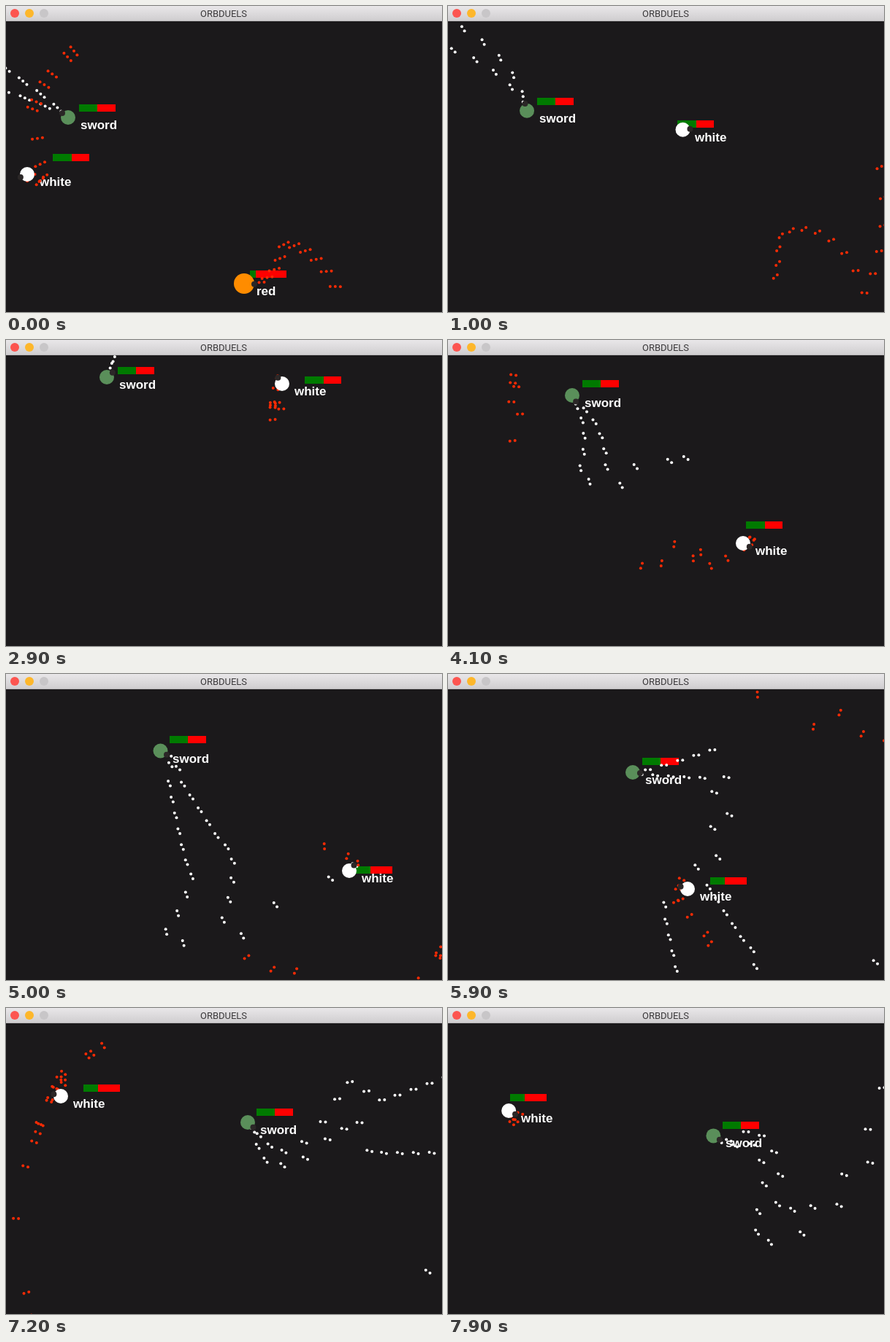
These frames come from a looping animation (597 by 420 pixels, 8 s). An HTML page with a canvas:

```html
<!DOCTYPE html>
<html>
<head>
<meta charset="utf-8">
<style>
  html, body { margin: 0; width: 100%; height: 100%; overflow: hidden; background: #1b191b; }
  canvas { display: block; }
</style>
</head>
<body>
<canvas id="stage" width="597" height="420"></canvas>
<script>
const ctx = document.getElementById('stage').getContext('2d');
const LOOP = 8000, FRAME = 100, LAG = 70, RAD = Math.PI / 180;

// path: waypoints [ms, x, y]; turns: key angles [ms, degrees]; aim(t, k): angle of shot k
const red = {
  name: 'red', color: '#ff8c00', shot: '#fa2b05', radius: 14, speed: 232, every: 95, dies: 1000,
  life: () => 8,
  path: [[-1200, 194, 381], [0, 326, 381], [1000, 436, 388]],
  turns: [[-1000, 4], [-480, -27], [0, 3], [700, -54], [1000, -40]],
  aim: t => at(red.turns, t)[0] * RAD
};

const sword = {
  name: 'sword', color: '#5a8f5a', shot: '#fff', radius: 10, speed: 202, every: 71,
  life: () => 25,
  path: [[-500, 80, 153], [0, 85, 153], [1300, 115, 141], [1900, 124, 114], [2900, 138, 51],
         [3200, 146, 31], [4100, 170, 76], [5900, 253, 135], [7200, 331, 157], [8000, 368, 178]],
  turns: [[-400, -148], [0, -143], [1390, -90], [1600, -50], [1900, -42], [2800, -80], [3100, 45],
          [3400, 72], [3900, 59], [4750, 59], [5250, 4], [6050, 6], [6200, -5], [6450, 4],
          [6850, 44], [7100, 50], [7640, 5], [7850, 32]],
  // Shots fan out by turns to either side
  aim: (t, k = null) => (at(sword.turns, t)[0] + (k === null ? 0 : k % 2 ? 8 : -8)) * RAD
};

const white = {
  name: 'white', color: '#fff', shot: '#fa2b05', radius: 10, speed: 232, every: 90, rest: [0, 1450],
  life: t => t < 4600 ? 26 : 20,
  path: [[-1100, 270, 250], [-500, 165, 160], [0, 29, 231], [70, 10, 238], [1500, 489, 133], [1900, 545, 81],
         [2100, 575, 85], [2350, 500, 106], [2600, 443, 96], [2900, 378, 60], [3080, 350, 31],
         [3550, 307, 185], [4100, 404, 279], [4350, 453, 306], [4700, 440, 320], [5000, 470, 270],
         [5200, 470, 250], [5400, 440, 268], [5700, 370, 300], [5900, 328, 295], [7000, 118, 126],
         [7200, 75, 121], [7530, 10, 115], [8000, 103, 148]],
  // Shoots ahead along its way, sweeping a little
  aim(t) {
    const [x0, y0] = at(white.path, t - 60), [x1, y1] = at(white.path, t + 60);
    return Math.atan2(y1 - y0, x1 - x0) + 0.35 * Math.sin(t / 110);
  }
};

const bots = [red, sword, white];

// Linear interpolation through rows of [ms, ...values]
function at(rows, t) {
  const last = rows.length - 1;
  if (t <= rows[0][0]) return rows[0].slice(1);
  if (t >= rows[last][0]) return rows[last].slice(1);
  const i = rows.findIndex(r => r[0] > t), a = rows[i - 1], b = rows[i];
  const u = (t - a[0]) / (b[0] - a[0]);
  return a.slice(1).map((v, j) => v + (b[j + 1] - v) * u);
}

function dot(x, y, r, color) {
  ctx.fillStyle = color;
  ctx.beginPath();
  ctx.arc(x, y, r, 0, 2 * Math.PI);
  ctx.fill();
}

function drawBody(bot, t) {
  const [x, y] = at(bot.path, t), angle = bot.aim(t);
  dot(x, y, bot.radius, bot.color);
  dot(x + bot.radius * Math.cos(angle), y + bot.radius * Math.sin(angle), 4, '#2b2727');
}

// The health bar trails behind its bot, the name does not
function drawTag(bot, t) {
  const [x, y] = at(bot.path, t), [lagX, lagY] = at(bot.path, t - LAG);
  const barX = Math.round(lagX + 16), barY = Math.round(lagY - 18);
  ctx.fillStyle = '#f00';
  ctx.fillRect(barX, barY, 50, 10);
  ctx.fillStyle = '#007a00';
  ctx.fillRect(barX, barY, bot.life(t), 10);

  ctx.font = 'bold 17px "Liberation Sans", Arial, sans-serif';
  ctx.textAlign = 'left';
  ctx.fillStyle = '#fff';
  ctx.fillText(bot.name, Math.round(x + 16.5), Math.round(y + 16));
}

// Every shot leaves a short row of dots along its flight
function drawShots(bot, t) {
  const dots = t < 100 ? 3 : 2, end = Math.min(t, bot.dies || LOOP);
  for (let k = Math.ceil(-1000 / bot.every); k * bot.every < end; k++) {
    const born = k * bot.every;
    if (bot.rest && born > bot.rest[0] && born < bot.rest[1]) continue;
    const [x, y] = at(bot.path, born), angle = bot.aim(born, k);
    const reach = bot.radius + 2 + (t - born) / 1000 * bot.speed;
    for (let i = 0; i < dots; i++) {
      const d = reach - 7 * i;
      if (d > bot.radius) dot(x + d * Math.cos(angle), y + d * Math.sin(angle), 2, bot.shot);
    }
  }
}

function drawTitle() {
  const shade = ctx.createLinearGradient(0, 0, 0, 20);
  shade.addColorStop(0, '#e9e7e9');
  shade.addColorStop(1, '#d0ced0');
  ctx.fillStyle = shade;
  ctx.fillRect(0, 0, 597, 20);
  ctx.fillStyle = '#b5b3b5';
  ctx.fillRect(0, 20, 597, 1);
  ['#fc5550', '#fdb72b', '#c8c6c8'].forEach((color, i) => dot(12 + 20 * i, 10, 6, color));
  ctx.font = '13px Roboto, Inter, sans-serif';
  ctx.textAlign = 'center';
  ctx.fillStyle = '#3c3a3c';
  ctx.fillText('ORBDUELS', 298, 15);
}

function draw(now) {
  const t = Math.floor(now % LOOP / FRAME) * FRAME;
  const alive = bots.filter(bot => !(t >= bot.dies));
  ctx.fillStyle = '#1b191b';
  ctx.fillRect(0, 0, 597, 420);
  alive.forEach(bot => drawTag(bot, t));
  bots.forEach(bot => drawShots(bot, t));
  alive.forEach(bot => drawBody(bot, t));
  drawTitle();
}

const start = performance.now();
function tick() {
  draw(performance.now() - start);
  requestAnimationFrame(tick);
}
tick();
</script>
</body>
</html>
```
